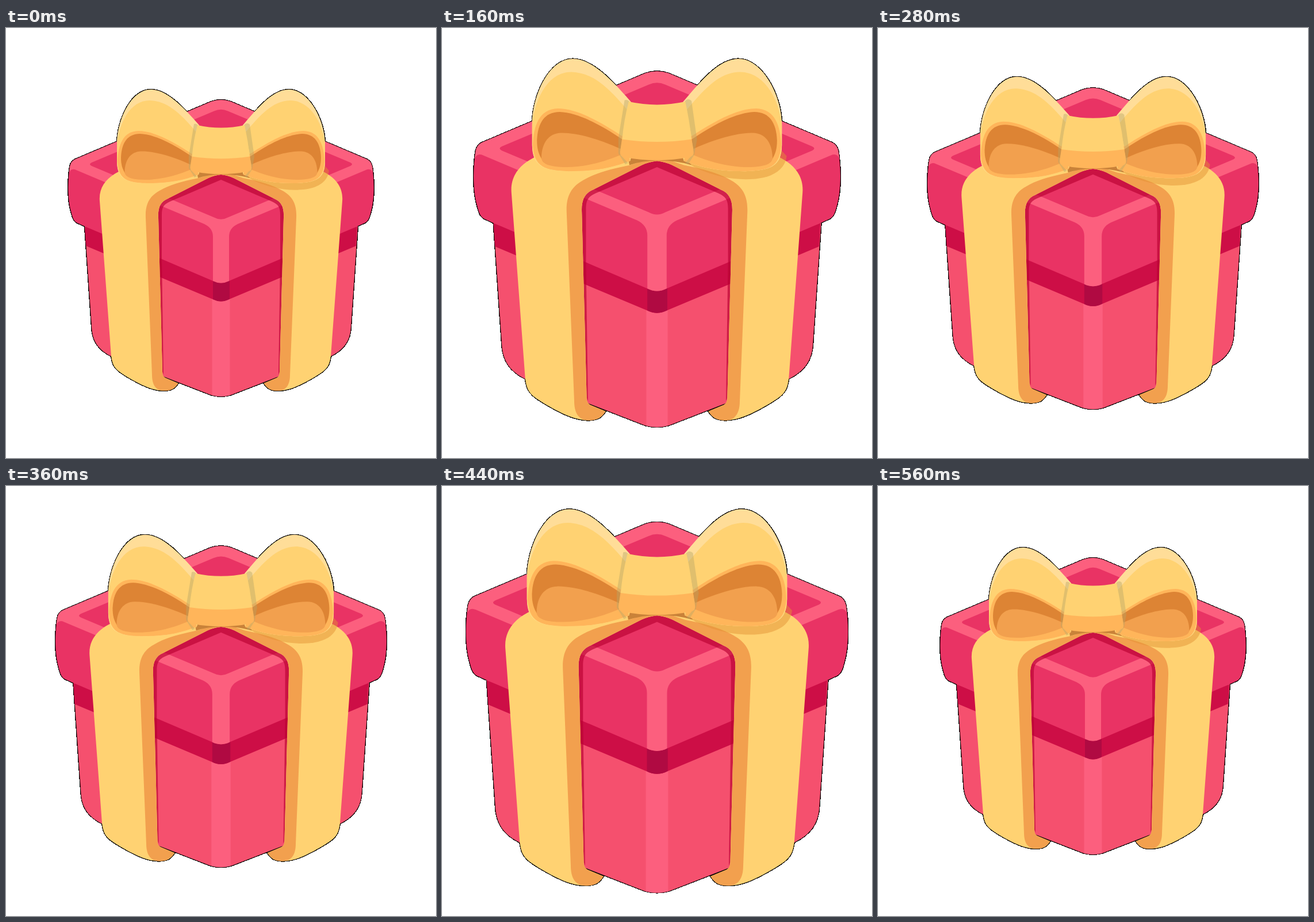
Write an HTML page that moves like this. It is 748 by 748 pixels and loops after 1000 ms.

```html
<!DOCTYPE html>
<html lang="en">
<head>
<meta charset="utf-8">
<title>Gift box</title>
<style>
  html, body { margin: 0; width: 100%; height: 100%; overflow: hidden; background: #fff; }
  svg { display: block; width: 100vw; height: 100vh; }
  .edge { fill: #000; stroke: #000; stroke-width: 2.4; stroke-linejoin: round; shape-rendering: crispEdges; }
  .edge path, defs path { vector-effect: non-scaling-stroke; }
  .body { fill: #f5506e; }
  .face { fill: #e93364; }
  .rim { fill: #fc5f7e; }
  .band { fill: #cd0e46; }
  .yellow { fill: #ffd272; }
  .pale { fill: #ffdd98; }
  .amber { fill: #ffb55a; }
  .orange { fill: #f2a04e; }
  .brown { fill: #dd8434; }
  .shade { fill: #ba0032; opacity: .65; }
  .cast { fill: #e19132; opacity: .48; }
  .crease { fill: #b5a468; opacity: .42; }
</style>
</head>
<body>
<svg viewBox="0 0 748 748">
  <defs>
    <path id="body" d="M137 345L149 520C150 545 161 560 183 571L357 638.500Q374 643 391 638.500L565 571C587 560 599 545 600 520L612 345Z"/>
    <path id="lid" d="M137 345L126 340C118 337 116 331 113 319C107 298 107 266 111 241Q113 231 121 228L357 128Q374 122 391 128L627 228Q635 231 637 241C641 266 641 298 635 319C632 331 630 337 622 340L611 345L388 440Q374 447 360 440Z"/>
    <path id="strap" d="M374 244L200 248C176 259 161 276 163 301L183 571C185 585 188 590 196 597C206 605 239 624 255 628C269 632 281 632 290 628Q295 625 299.600 618L277 608.500Q272 606 272 598L265 330C264 312 269 302 281 297L352 261Q363 256 374 255Z"/>
    <path id="loopL"/>
    <path id="loopR"/>

    <g id="strapHalf">
      <path class="shade" d="M374 255Q363 256 352 261L281 297C269 302 264 312 265 330L272 598L274 603L271 400V325C271 312 274 307 285 302L374 264Z"/>
      <use href="#strap" class="yellow"/>
      <path class="orange" d="M374 248L335 261C305 267 284 273 267 283C249 293 242 307 243 330L254 603C254 620 260 631 275 631Q291 632 299.600 618L277 608.500Q272 606 272 598L265 330C264 312 269 302 281 297L352 261Q363 256 374 255Z"/>
    </g>
    <g id="mouth">
      <path class="amber" d="M194 232C195 204 203 180 230 179C258 179 292 198 328 222L335 255C307 266 281 270 246 270C211 269 196 264 194 232Z"/>
      <path class="brown" d="M208 254C202 245 200 237 200 225C201 200 211 184 233 184C260 185 295 204 324 224L320 243Z"/>
      <path class="orange" d="M206.500 250C207 229 217 215 235 214.500C258 214 292 224 322 238V246C294 258 267 264 242 264C220 264 206 260 206.500 250Z"/>
    </g>
  </defs>

  <g id="gift">
    <g class="edge">
      <use href="#body"/>
      <use href="#lid"/>
      <use href="#strap"/>
      <use href="#strap" transform="matrix(-1 0 0 1 748 0)"/>
      <use href="#loopL"/>
      <use href="#loopR" transform="matrix(-1 0 0 1 748 0)"/>
    </g>

    <use href="#body" class="body"/>
    <path class="rim" d="M358.500 460H389.500V639Q374 643 358.500 639Z"/>
    <path class="band" d="M137 345L139 379L360 472Q374 479 388 472L609 379L611 345L388 430H360Z"/>
    <path fill="#b00a42" d="M360 430H389V471.500Q374 479 360 472Z"/>

    <use href="#lid" class="face"/>
    <path class="rim" d="M109.500 252L111 241Q113 231 121 228L357 128Q374 122 391 128L627 228Q635 231 637 241L638.500 252Q635 243 626 247L403 341Q388 348 388 363V440Q374 447 360 440V363Q360 348 345 341L122 247Q113 243 109.500 252Z"/>
    <path class="face" d="M149 234L362 144.500Q374 139 386 144.500L599 234Q605 237 599 240L386 329.500Q374 336 362 329.500L149 240Q143 237 149 234Z"/>

    <use href="#strapHalf"/>
    <use href="#strapHalf" transform="matrix(-1 0 0 1 748 0)"/>
    <path class="cast" d="M410 252L428 264C455 277 486 284 517 281C546 278 560 265 562 248L550 235Z"/>
    <path fill="#c98239" d="M332 250H416L424 261Q400 254 374 254.500Q352 255 334 261Z"/>

    <use href="#loopL" class="pale"/>
    <path class="yellow" d="M193 202C197 166 215 126 250 126C283 127 306 152 331 181L346 215L335 255C307 266 281 270 246 270C211 269 194 264 193 232Z"/>
    <use href="#mouth"/>
    <g transform="matrix(-1 0 0 1 748 0)">
      <use href="#loopR" class="pale"/>
      <path class="yellow" d="M193 202C197 166 218 126 254 126C285 127 306 152 331 181L346 215L335 255C307 266 281 270 246 270C211 269 194 264 193 232Z"/>
      <use href="#mouth"/>
    </g>

    <path class="crease" d="M327 167Q331 165 336 171L324 224L321 246L332 258L328 260L318 244V222Z"/>
    <path class="crease" d="M414 169Q419 163 424 168L432 224L428 246L419 260L415 258L425 246V224Z"/>
    <path class="amber" d="M324 218L320.500 242Q320 248 326 249.500Q374 259 421 249.500Q428 248 427 242L423.500 218Z"/>
    <path class="yellow" d="M333 169Q374 178 415 169Q421 196 424 223.500Q374 231 323.500 223.500Q326 196 333 169Z"/>
  </g>
</svg>
<script>
  const $ = id => document.getElementById(id);

  // Outline of one bow loop with its top at x
  const loop = x => `M193 199C194 160 ${x - 35} 107 ${x} 107C${x + 30} 107 313 143 336 169L346 215
    L335 255C307 266 281 270 246 270C211 269 193 264 193 232Z`;
  $('loopL').setAttribute('d', loop(252));
  $('loopR').setAttribute('d', loop(256));

  const STEP = 40, STEPS = 25;

  // Slow swell, then a quick bounce down, up and back to rest
  function scaleAt(n) {
    if (n < 5) return 1 + n / 20;
    if (n < 11) return 1 + Math.abs(n - 8) / 12;
    return 1 + Math.max(0, 14 - n) / 12;
  }

  function draw() {
    const n = Math.floor(performance.now() / STEP) % STEPS;
    $('gift').setAttribute('transform', `translate(374 374) scale(${scaleAt(n)}) translate(-374 -374)`);
    requestAnimationFrame(draw);
  }
  draw();
</script>
</body>
</html>
```
